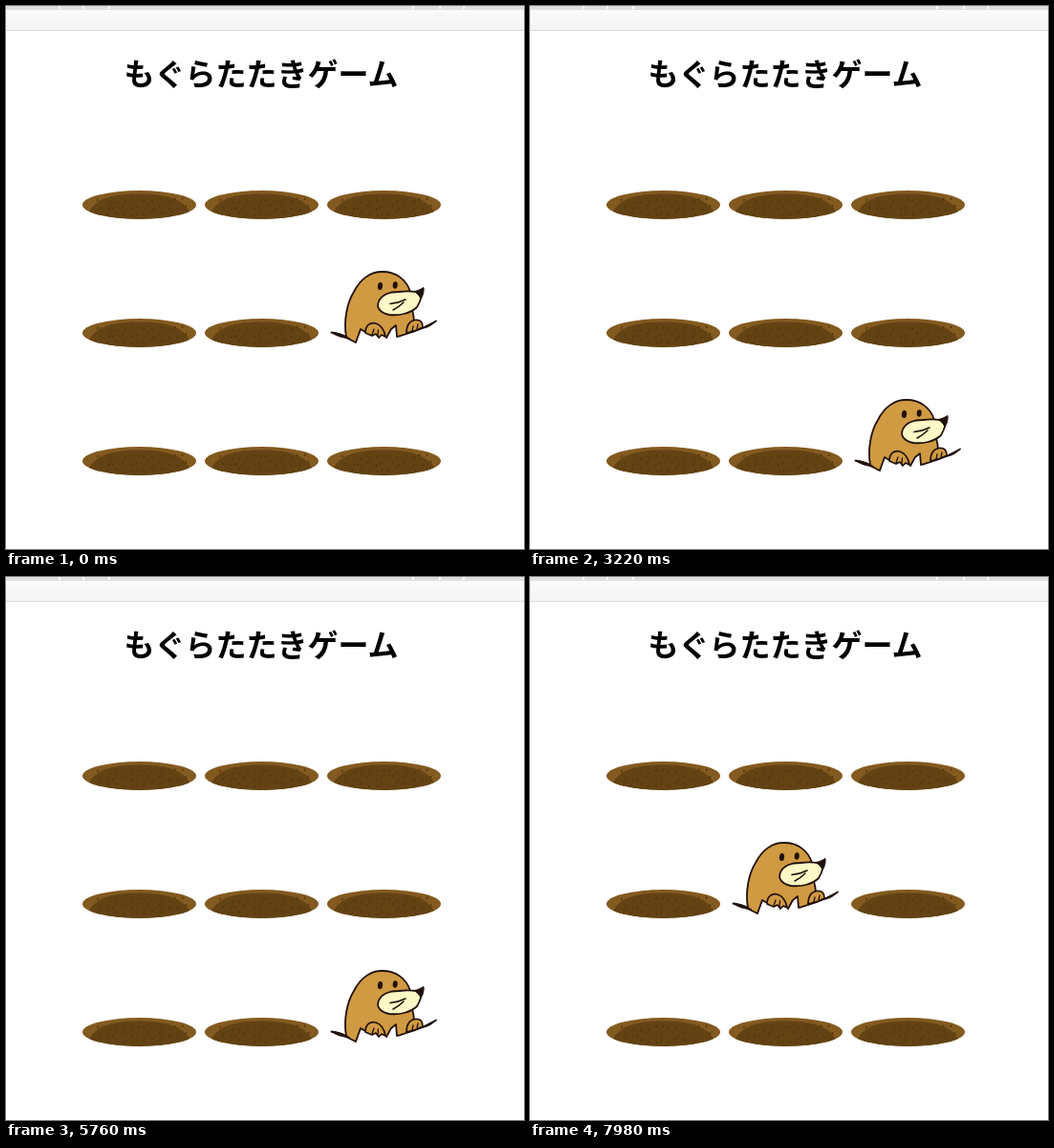
Write an HTML page with a canvas that moves like this. It is 542 px wide and 568 px high and loops after 8 s.

```html
<!DOCTYPE html>
<html lang="ja">
<head>
<meta charset="utf-8">
<title>もぐらたたきゲーム</title>
<style>
  html, body { margin: 0; width: 100%; height: 100%; overflow: hidden; background: #fff; }
  canvas { position: absolute; left: 0; top: 0; }
  h1 {
    position: absolute; left: 0; top: 53px; width: 534px; margin: 0;
    font: bold 32px/32px "Noto Sans CJK JP", "Noto Sans CJK", sans-serif;
    text-align: center; white-space: nowrap; color: #000;
  }
</style>
</head>
<body>
<canvas id="stage" width="542" height="568"></canvas>
<h1>もぐらたたきゲーム</h1>
<script>
const ctx = document.getElementById('stage').getContext('2d');
const LOOP = 8000;
const INK = '#21110b', FUR = '#d09a42', CREAM = '#fdf8c6';

// The cell holding the mole from each start time on; null means all holes are empty.
const schedule = [
  { at: 0, cell: [2, 1] },
  { at: 440, cell: null },
  { at: 3220, cell: [2, 2] },
  { at: 6020, cell: [1, 1] }
];

function shape(d, fill, width) {
  const p = new Path2D(d);
  if (fill) {
    ctx.fillStyle = fill;
    ctx.fill(p);
  }
  if (width) {
    ctx.lineWidth = width;
    ctx.strokeStyle = INK;
    ctx.stroke(p);
  }
}

function oval(x, y, rx, ry, fill, tilt = 0) {
  ctx.beginPath();
  ctx.ellipse(x, y, rx, ry, tilt, 0, Math.PI * 2);
  ctx.fillStyle = fill;
  ctx.fill();
}

function seeded(seed) {
  return () => (seed = (seed * 16807) % 2147483647) / 2147483647;
}

function drawBar() {
  ctx.fillStyle = '#dedede';
  ctx.fillRect(0, 0, 542, 4);
  ctx.fillStyle = '#fff';
  for (const x of [55, 80, 107, 425, 453, 478]) ctx.fillRect(x, 0, 2, 3);
  const g = ctx.createLinearGradient(0, 4, 0, 25);
  g.addColorStop(0, '#fafafa');
  g.addColorStop(1, '#f4f4f4');
  ctx.fillStyle = g;
  ctx.fillRect(0, 4, 542, 21);
  ctx.fillStyle = '#dadada';
  ctx.fillRect(0, 25, 542, 1);
}

function drawHole() {
  ctx.save();
  oval(59.5, 66, 59.5, 15, '#835a1f');
  ctx.clip();
  shape('M7 73C14 60 30 54.5 59 54.5S105 60 112 73L112 84H7Z', '#634314');
  const rnd = seeded(41);
  for (let i = 0; i < 34; i++) {
    const x = 16 + (i % 12) * 8 + rnd() * 5;
    const y = 59 + Math.floor(i / 12) * 7 + rnd() * 5;
    oval(x, y, 0.8, 1.4, '#543609', 0.3);
  }
  ctx.restore();
}

function drawMole() {
  ctx.lineJoin = ctx.lineCap = 'round';
  // body and torn ground edge
  shape('M19 69C18 53 21 35 27 25C33 11 45 1.8 58 2C72 2 83 10 87 23L89 42' +
    'L91 55L101 60L82 67L73 70L72 59L67 62L62 71L57 68L54 71L51 67L47 69' +
    'L42 65L36 62L30 76L20 71Z', FUR);
  shape('M20 70C17 53 21 34 28 23C35 9 46 1.8 58 2C72 2 83 10 87 23', null, 1.8);
  shape('M89 42C90 46 91 49 91 54', null, 1.8);
  shape('M4.5 65.5C10 66 15 67 20 71L30 76L35 62L40 65', null, 1.8);
  shape('M5 66C11 66 17 67 24 72C17 71 11 70 5 66Z', INK, 0.8);
  shape('M62 71L67 62L72 58L73 70C83 67 94 64 102 60C107 58 110 56 114 53.5', null, 1.8);
  shape('M98 61.5C104 58 109 55.5 114 53.5C110 58 105 61 98 61.5Z', INK, 0.6);
  // paws
  shape('M40 66C40 58 45 54.5 51 56C57 58 60 64 61 70L57 68L54 71L51 67L47 69Z', FUR, 1.7);
  shape('M47 68L49 62M53 69L53.5 63', null, 1.3);
  shape('M83 66C83 58 86 53.5 92 52.5C98 52 100 55 100 60L94 63Z', FUR, 1.7);
  shape('M89 64L90 59M94 62L95 57', null, 1.3);
  // head
  shape('M54 33C57 26 66 23 75 23C85 22 93 22 97 25C100 28 97 34 94 39' +
    'C87 46 75 48 65 47C56 45 51 40 54 33Z', CREAM, 1.8);
  shape('M91 22.5C95 22 98 20 101 18.5C101.5 22 100.5 27 98 30.5C97 27 94 24.5 91 22.5Z', INK, 1);
  shape('M66 35.5C72 35 77 33.5 82 31M69 42C73 40 77 37 80 34', null, 1.6);
  oval(55.5, 17, 2.6, 4.1, INK, 0.1);
  oval(71.2, 16, 2.5, 3.7, INK, 0.1);
}

function frame(now) {
  const t = now % LOOP;
  const { cell } = schedule.filter(s => s.at <= t).pop();
  ctx.fillStyle = '#fff';
  ctx.fillRect(0, 0, 542, 568);
  drawBar();
  for (let row = 0; row < 3; row++) {
    for (let col = 0; col < 3; col++) {
      const hit = cell && cell[0] === col && cell[1] === row;
      ctx.save();
      ctx.translate(80 + col * 128, 142 + row * 134);
      if (hit) drawMole();
      else drawHole();
      ctx.restore();
    }
  }
}

const start = performance.now();
function tick() {
  frame(performance.now() - start);
  requestAnimationFrame(tick);
}
tick();
</script>
</body>
</html>
```
